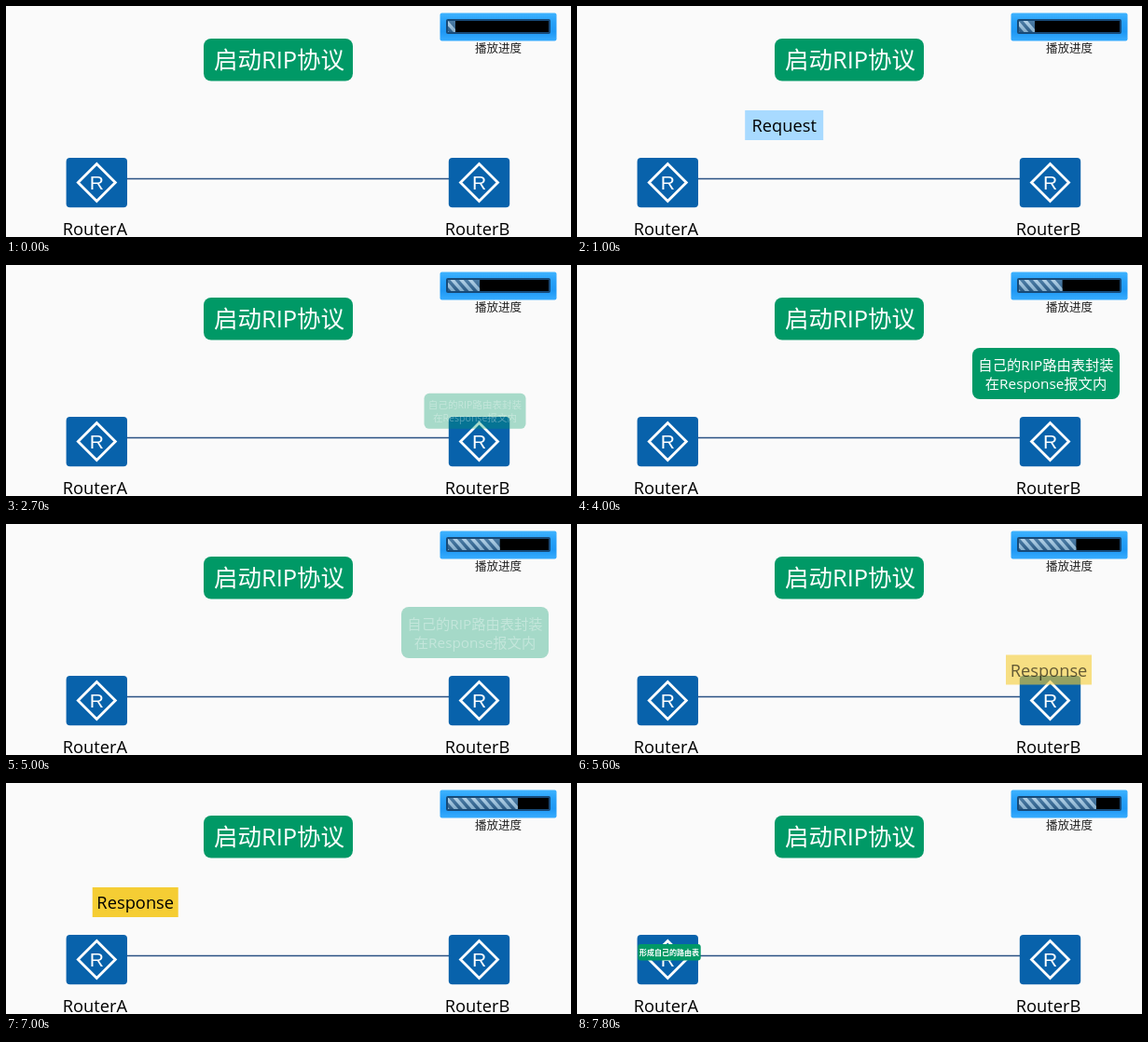
Recreate the animation shown at these times as an HTML page with a canvas. Size 606x248 px, loop 8000 ms.

```html
<!DOCTYPE html>
<html lang="zh">
<head>
<meta charset="utf-8">
<style>
  html, body { margin: 0; height: 100%; overflow: hidden; background: #fafafa; }
  canvas { display: block; }
</style>
</head>
<body>
<canvas id="stage" width="606" height="248"></canvas>
<script>
const ctx = document.getElementById('stage').getContext('2d');
const SANS = '"Open Sans", "Noto Sans CJK SC", "Noto Sans CJK", sans-serif';
const GREEN = '#009966';
const LOOP = 8000;
// Ticks of 100 ms on which the picture stands still
const HOLDS = [3, 9, 16, 22, 28, 35, 41, 47, 53, 60, 66, 74, 79];

const clamp = v => Math.max(0, Math.min(1, v));
const mix = (a, b, p) => a + (b - a) * p;

function box(x, y, w, h, r, fill) {
  ctx.fillStyle = fill;
  ctx.beginPath();
  ctx.roundRect(x, y, w, h, r);
  ctx.fill();
}

function text(str, x, baseline, size, color, weight = 400, family = SANS) {
  ctx.font = `${weight} ${size}px ${family}`;
  ctx.textAlign = 'center';
  ctx.fillStyle = color;
  ctx.fillText(str, x, baseline);
}

// Draws around (x, y) with its own scale and opacity
function placed(x, y, scale, alpha, draw) {
  if (alpha <= 0) return;
  ctx.save();
  ctx.translate(x, y);
  ctx.scale(scale, scale);
  ctx.globalAlpha = alpha;
  draw();
  ctx.restore();
}

function gradient(y0, y1, ...colors) {
  const g = ctx.createLinearGradient(0, y0, 0, y1);
  colors.forEach((c, i) => g.addColorStop(i / (colors.length - 1), c));
  return g;
}

function router(x, name) {
  box(x - 32.7, 163, 65.4, 53.3, 4, '#0862ab');
  ctx.strokeStyle = '#fff';
  ctx.lineWidth = 2.8;
  ctx.beginPath();
  ctx.moveTo(x, 169.5);
  ctx.lineTo(x + 20, 189.5);
  ctx.lineTo(x, 209.5);
  ctx.lineTo(x - 20, 189.5);
  ctx.closePath();
  ctx.stroke();
  text('R', x, 197, 21, '#fff', 400, '"Liberation Sans", sans-serif');
  text(name, x - 2, 246, 18.3, '#000');
}

function progressBar(step) {
  const end = 482 + step * 75 / 66;
  box(465.5, 7.5, 125, 30, 2, gradient(7, 38, '#40b4ff', '#27a0f8', '#1f98f4', '#38adff'));
  box(472, 14, 112, 16, 2, '#174a78');
  box(474, 16, 108, 12, 0, '#000');
  ctx.save();
  ctx.beginPath();
  ctx.rect(474, 16, end - 474, 12);
  ctx.clip();
  box(474, 16, 108, 12, 0, gradient(16, 28, '#4e7fa8', '#2b5a84'));
  ctx.strokeStyle = gradient(16, 28, '#b4d2e8', '#82abc9');
  ctx.lineWidth = 3.6;
  for (let x = end - 4; x > 455; x -= 9.5) {
    ctx.beginPath();
    ctx.moveTo(x - 8, 14);
    ctx.lineTo(x + 6, 30);
    ctx.stroke();
  }
  ctx.restore();
  text('播放进度', 528, 49.5, 12.5, '#222');
}

function packet(label, x, y, w, color, alpha) {
  placed(x, y, 1, alpha, () => {
    box(0, 0, w, 32, 0, color);
    text(label, w / 2, 23, 18.3, '#000');
  });
}

function request(n) {
  if (n < 2 || n > 18) return;
  const away = Math.max(5 - n, n - 15, 0);
  packet('Request', mix(59, 463, clamp((n - 5) / 10)), 112 + 13 * away,
    84, '#a8daff', 1 - away / 4);
}

function response(n) {
  if (n < 45 || n > 62) return;
  const rise = Math.max(49 - n, 0), sink = Math.max(n - 60, 0);
  packet('Response', mix(460, 56, clamp((n - 49) / 11)), 112 + 14.25 * rise + 9.5 * sink,
    92, '#f5cd34', 1 - rise / 5 - sink / 3);
}

function bubble(n) {
  const p = clamp((n - 20) / 9);
  const alpha = n < 40 ? p : clamp((43.5 - n) / 4.4);
  placed(503, mix(177, 116.5, p), mix(0.535, 1, p), alpha, () => {
    box(-79, -27.5, 158, 55, 8, GREEN);
    text('自己的RIP路由表封装', 0, -3.5, 15.3, '#fff');
    text('在Response报文内', 0, 16.5, 15.3, '#fff');
  });
}

function tableLabel(n) {
  if (n < 63) return;
  placed(99, mix(185, 181.8, (n - 62) / 4), (n - 62) / 4, 1, () => {
    box(-33.7, -8.7, 67.4, 17.4, 3, GREEN);
    text('形成自己的路由表', 0, 3.1, 8, '#fff', 700);
  });
}

function draw(now) {
  const tick = Math.floor(now % LOOP / 100);
  const step = tick - HOLDS.filter(h => h <= tick).length;
  box(0, 0, 606, 248, 0, '#fafafa');
  box(212, 35, 160, 45.5, 8, GREEN);
  text('启动RIP协议', 293, 67, 25.5, '#fff');
  box(130, 184.8, 345, 1.5, 0, '#2a5082');
  router(97.3, 'RouterA');
  router(507.5, 'RouterB');
  progressBar(step);
  request(step);
  bubble(step);
  response(step);
  tableLabel(step);
}

const start = performance.now();
function loop() {
  draw(performance.now() - start);
  requestAnimationFrame(loop);
}
loop();
</script>
</body>
</html>
```
